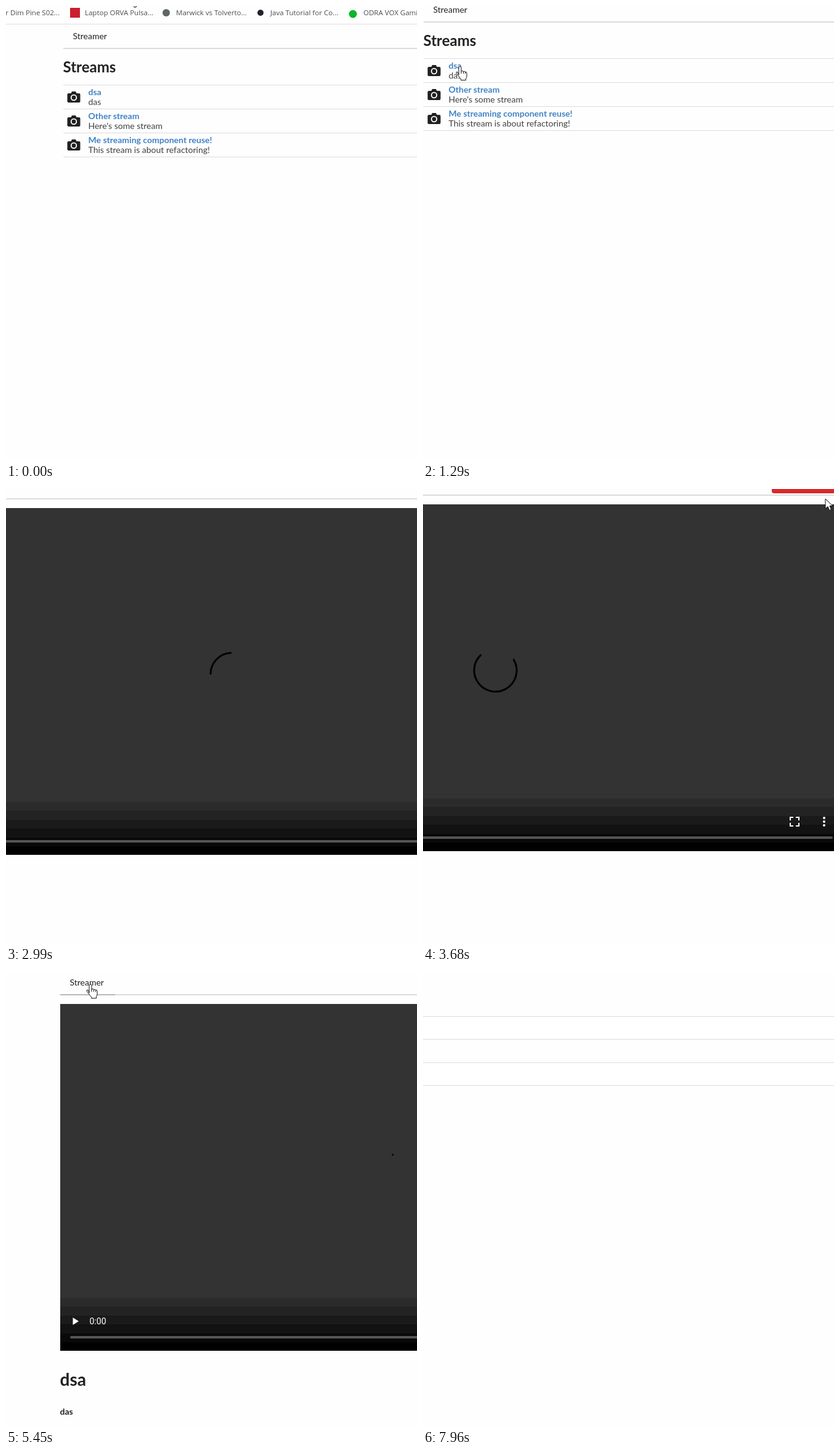
Write an HTML page that moves like this. It is 667 by 740 pixels and loops after 8000 ms.

```html
<!DOCTYPE html>
<html lang="en">
<head>
<meta charset="utf-8">
<title>Streamer</title>
<style>
  html, body { margin: 0; width: 100%; height: 100%; overflow: hidden; background: #fefefe; }
  svg { display: block; width: 667px; height: 740px; font: 14px Lato, sans-serif; fill: #212121; }
  .b { font-weight: 700; }
  .link { font-weight: 700; fill: #4183c4; }
  .desc { fill: #404040; }
  .white { fill: #fff; }
  .rule { fill: #dcdcdd; }
  .marks { font: 11.5px "Open Sans", sans-serif; fill: #4a4d51; }
  .input { fill: #fff; stroke: #dcdcdd; }
  .time { font: 14px Roboto, sans-serif; fill: #fff; }
</style>
</head>
<body>
<svg viewBox="0 0 667 740">
  <g id="page">
    <g class="marks">
      <text x="87" y="15" text-anchor="end">er Dim Pine S02...</text>
      <rect x="104" y="3" width="16" height="16" fill="#c9202c"/>
      <text x="128" y="15">Laptop ORVA Pulsa...</text>
      <circle cx="260" cy="11" r="6" fill="#5f6668"/>
      <text x="276" y="15">Marwick vs Tolverto...</text>
      <circle cx="413" cy="11" r="5" fill="#25202c"/>
      <text x="429" y="15">Java Tutorial for Co...</text>
      <circle cx="563" cy="13" r="6.5" fill="#0cb52b"/>
      <text x="580" y="15">ODRA VOX Gaming Lap...</text>
    </g>
    <rect class="rule" y="29" width="1400" height="1"/>

    <text x="108.5" y="54">Streamer</text>
    <rect class="rule" x="93" y="68" width="1127" height="2"/>
    <rect id="hover" x="93" y="68" width="89" height="2" fill="#b9b9ba"/>
    <rect x="1105" y="30" width="115" height="36" rx="4" fill="#db2828"/>
    <circle class="white" cx="1131" cy="48" r="6"/>
    <text class="b white" x="1148" y="52">Sign Out</text>

    <g id="list">
      <text class="b" x="92.5" y="108" font-size="24">Streams</text>
      <g id="rows"></g>
      <rect class="rule" x="93" y="245" width="1127" height="1"/>
      <rect x="1087" y="260" width="133" height="36" rx="4" fill="#2185d0"/>
      <text class="b white" x="1108" y="283">Create Stream</text>
    </g>

    <g id="show">
      <rect x="93" y="84" width="1127" height="564" fill="#333"/>
      <g id="bands"></g>
      <rect x="109" y="624" width="1095" height="4" rx="2" fill="#555"/>
      <path class="white" d="M113.5 594v12l9.5-6z"/>
      <text class="time" x="140.5" y="605">0:00</text>
      <path d="M1135 598v-5h5m4 0h5v5m0 4v5h-5m-4 0h-5v-5" fill="none" stroke="#fff" stroke-width="2"/>
      <path d="M1190 594v.01m0 6v.01m0 6v.01" stroke="#fff" stroke-width="4" stroke-linecap="round"/>
      <circle id="spinner" cx="656.5" cy="354" r="34.5" pathLength="360" fill="none"
              stroke="#000" stroke-width="3" stroke-linecap="round"/>
      <text class="b" x="92.5" y="705" font-size="28">dsa</text>
      <text class="b" x="92.5" y="752">das</text>
    </g>

    <g id="form">
      <text class="b" x="93" y="102" font-size="18">Create a Stream</text>
      <text class="b" x="93" y="135" font-size="13">Enter Title</text>
      <rect class="input" x="93.5" y="143.5" width="1126" height="37" rx="4"/>
      <text class="b" x="93" y="210" font-size="13">Enter Description</text>
      <rect class="input" x="93.5" y="218.5" width="1126" height="37" rx="4"/>
      <rect x="93" y="270" width="85" height="36" rx="4" fill="#2185d0"/>
      <text class="b white" x="114" y="293">Submit</text>
    </g>

    <g id="cursor" fill="#fff" stroke="#111" stroke-linejoin="round">
      <path id="arrow" d="M0 0v16l4-3.500 2.500 6 3-1-2.500-6h5z"/>
      <g id="hand">
        <path d="M-2 14V2a2 2 0 0 1 4 0v6q2-1.500 3.500.5 2-1 3 .7 2.500-.5 2.500 2v5q0 2-1.500 4v2.500h-8v-2q-2-2-3.500-4.500l-4-5q-.5-2.500 2-2z"/>
        <path d="M2 8v4M5.500 8.500v3.500M8.500 9.200v3"/>
      </g>
    </g>
  </g>
</svg>
<script>
const LOOP = 8000, STEP = 130;
const el = id => document.getElementById(id);
const show = (id, on) => el(id).setAttribute('visibility', on ? 'visible' : 'hidden');
const mix = (a, b, p) => a + (b - a) * p;

const streams = [
  ['dsa', 'das'],
  ['Other stream', "Here's some stream"],
  ['Me streaming component reuse!', 'This stream is about refactoring!'],
];
el('rows').innerHTML = streams.map(([title, text], i) => `
  <g transform="translate(0 ${i * 39})">
    <rect class="rule" x="93" y="128" width="1127" height="1"/>
    <path d="M101.5 142h4l1.500-3h6l1.500 3h4q2 0 2 2v11q0 2-2 2h-17q-2 0-2-2v-11q0-2 2-2z"/>
    <circle cx="110" cy="149" r="4.3" stroke="#fff" stroke-width="1.8"/>
    <text class="link" x="133.5" y="145">${title}</text>
    <text class="desc" x="133.5" y="161">${text}</text>
  </g>`).join('');

// The player's control shade darkens in flat steps
for (let i = 0; i < 6; i++) {
  const y = Math.round(562 + 14.4 * i), v = Math.round(43 - 8.5 * i);
  el('bands').innerHTML +=
    `<rect x="93" y="${y}" width="1127" height="${648 - y}" fill="rgb(${v},${v},${v})"/>`;
}

// Poses on the page: view x, y and pointer x, y
const start = [0, 0, 202, -16];
const firstStream = [92, 43, 152, 141];
const leaving = [92, 43, 700, 58];
const player = [290, 53, 1100, 75];
const playerEnd = [601, 60, 1215, 75];
const returning = [215, 50, 200, 50];
const menu = [5, 32, 142, 52];
const account = [547, 54, 1230, 45];
const create = [601, 61, 1154, 279];
const toForm = [601, 61, 700, 170];
const formMiddle = [420, 71, 380, 160];

const timeline = [
  [0, start], [1140, firstStream], [1840, firstStream], [2620, leaving], [2990, player],
  [3700, playerEnd], [4490, returning], [4780, menu], [5850, menu], [6500, account],
  [7010, create], [7160, create], [7690, toForm], [7960, formMiddle],
];

// Each stretch advances in equal steps of about STEP ms
function poseAt(time) {
  const i = timeline.findIndex(([t]) => t > time);
  if (i < 0) return [7960, formMiddle];
  const [t0, from] = timeline[i - 1], [t1, to] = timeline[i];
  const steps = Math.round((t1 - t0) / STEP);
  const p = Math.floor((time - t0) / (t1 - t0) * steps) / steps;
  return [mix(t0, t1, p), from.map((v, k) => Math.round(mix(v, to[k], p)))];
}

// cubic-bezier(.4, 0, .2, 1)
function ease(x) {
  let lo = 0, hi = 1, u;
  for (let i = 0; i < 20; i++) {
    u = (lo + hi) / 2;
    const v = 1 - u;
    if (1.2 * v * v * u + 0.6 * v * u * u + u ** 3 < x) lo = u; else hi = u;
  }
  return u * u * (3 - 2 * u);
}

function drawSpinner(t) {
  const turn = (t - 5468) / 666.5, n = Math.floor(turn), e = ease(turn - n);
  const sweep = Math.max(0.1, 270 * (n % 2 ? 1 - e : e));
  const middle = 0.238 * (t - 4490) + 135 * (n + e) - 2;
  el('spinner').setAttribute('stroke-dasharray', `${sweep} 360`);
  el('spinner').setAttribute('transform', `rotate(${middle - sweep / 2} 656.5 354)`);
}

function draw(time) {
  const [t, [x, y, cx, cy]] = poseAt(time);
  const scene = t < 1840 ? 'list' : t < 5700 ? 'show' : t < 7160 ? 'list' : 'form';
  for (const id of ['list', 'show', 'form']) show(id, id === scene);

  const over = (left, top, w, h) => cx > left && cx < left + w && cy > top && cy < top + h;
  const onMenu = over(93, 31, 89, 39);
  const onLink = scene === 'list' && (over(133, 134, 23, 16) || over(1087, 260, 133, 36));
  show('hover', onMenu);
  show('hand', onMenu || onLink);
  show('arrow', !onMenu && !onLink);
  el('page').setAttribute('transform', `translate(${-x} ${-y})`);
  el('cursor').setAttribute('transform', `translate(${cx} ${cy})`);
  drawSpinner(t);
}

function loop() {
  draw(performance.now() % LOOP);
  requestAnimationFrame(loop);
}
loop();
</script>
</body>
</html>
```
